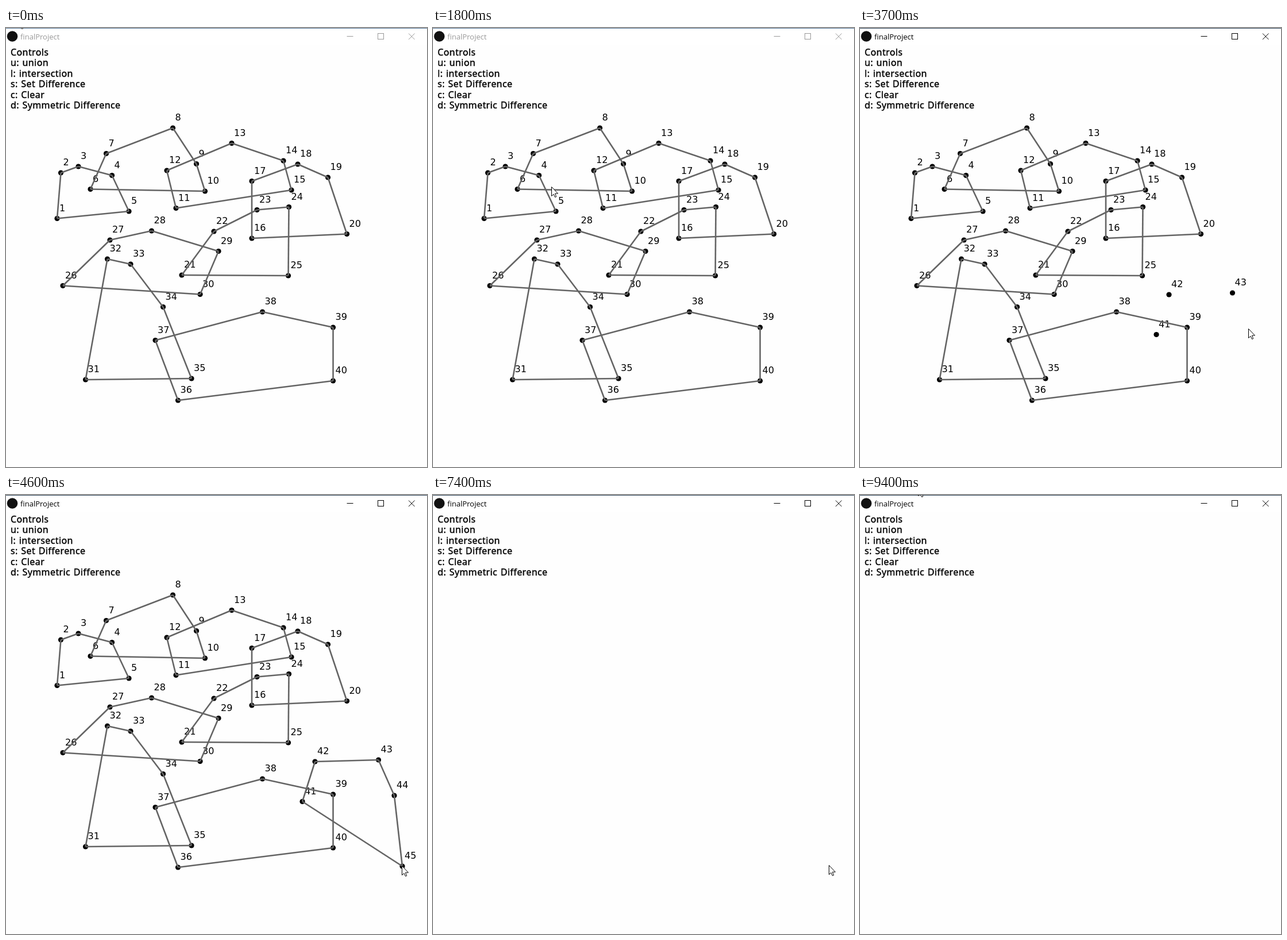
Animation, 733 px wide and 764 px high, one loop 9500 ms. Source, as an HTML page with a canvas:

```html
<!DOCTYPE html>
<html lang="en">
<head>
<meta charset="utf-8">
<title>Polygon union</title>
<style>
  html, body { margin: 0; width: 100%; height: 100%; overflow: hidden; background: #fff; }
  canvas { display: block; }
</style>
</head>
<body>
<canvas id="stage" width="733" height="764"></canvas>
<script>
const ctx = document.getElementById('stage').getContext('2d');
const LOOP = 9500, STEP = 100;
const FOCUS_AT = 2600, UNION_AT = 5100, CLEAR_AT = 7400;
const GRAY = '#646464', RED = '#ff0000';

// Corners in clicking order; the last polygon is clicked during the loop.
const polygons = [
  [[89, 331.5], [95.5, 252], [126, 241], [184.5, 256.5], [214, 319]],
  [[147, 280.5], [174.5, 218.5], [290.5, 174], [331.5, 236.5], [346.5, 284]],
  [[296, 313.5], [280, 248], [393, 200.5], [483, 231], [497, 282]],
  [[428, 366], [428, 266.5], [508, 237], [560.5, 260], [593.5, 358.5]],
  [[306, 430], [362, 354], [437, 316.5], [492.5, 311.5], [491.5, 431]],
  [[99, 448.5], [181, 369], [253.5, 353], [370, 388.5], [338, 463.5]],
  [[138.5, 612], [176.5, 402], [217, 411], [273.5, 485.5], [323, 610]],
  [[299.5, 648], [260, 543.5], [446.5, 494], [569.5, 521], [569.5, 614]],
  [[516, 533.5], [538, 464], [648.5, 461], [676, 523], [690, 646]]
];
const points = polygons.flat();
const clicked = polygons[polygons.length - 1];

// The cursor rests between moves and clicks one step after reaching a corner.
const entry = [21, -17];
const moves = [
  { from: 200, to: 600, goal: [181, 243] },
  { from: 1700, to: 1800, goal: [206, 276] },
  { from: 1800, to: 2200, goal: [541, 538] },
  { from: 2300, to: 2600, goal: clicked[0] },
  { from: 2700, to: 3000, goal: clicked[1] },
  { from: 3100, to: 3400, goal: clicked[2] },
  { from: 3500, to: 3700, goal: clicked[3] },
  { from: 3800, to: 4100, goal: clicked[4] },
  { from: 4400, to: 4800, goal: [689, 644] },
  { from: 7900, to: 8100, goal: [358, 14] },
  { from: 8100, to: 8200, goal: [495, 25] },
  { from: 8300, to: 8900, goal: [2, 6] },
  { from: 8900, to: 9300, goal: [101, -15] }
];
const clickTimes = moves.filter(m => clicked.includes(m.goal)).map(m => m.to + STEP);

const edgesOf = poly => poly.map((p, i) => [p, poly[(i + 1) % poly.length]]);
const mix = (a, b, k) => [a[0] + (b[0] - a[0]) * k, a[1] + (b[1] - a[1]) * k];
const easeOut = k => 1 - (1 - k) ** 2;

// Fraction along a-b at which it meets c-d, or null
function crossing([a, b], [c, d]) {
  const rx = b[0] - a[0], ry = b[1] - a[1], sx = d[0] - c[0], sy = d[1] - c[1];
  const qx = c[0] - a[0], qy = c[1] - a[1];
  const den = rx * sy - ry * sx;
  const k = (qx * sy - qy * sx) / den, m = (qx * ry - qy * rx) / den;
  return k > 0 && k < 1 && m > 0 && m < 1 ? k : null;
}

function inside([x, y], poly) {
  return edgesOf(poly).reduce((odd, [a, b]) =>
    (a[1] > y) !== (b[1] > y) && x < a[0] + (b[0] - a[0]) * (y - a[1]) / (b[1] - a[1]) ? !odd : odd, false);
}

// Pieces of the edges that lie outside all other polygons
function unionOutline() {
  const pieces = [];
  for (const poly of polygons) {
    const others = polygons.filter(p => p !== poly);
    const otherEdges = others.flatMap(edgesOf);
    for (const edge of edgesOf(poly)) {
      const cuts = otherEdges.map(e => crossing(edge, e)).filter(k => k !== null);
      const stops = [0, ...cuts, 1].sort((a, b) => a - b);
      for (let i = 1; i < stops.length; i++) {
        const middle = mix(...edge, (stops[i - 1] + stops[i]) / 2);
        if (!others.some(p => inside(middle, p)))
          pieces.push([mix(...edge, stops[i - 1]), mix(...edge, stops[i])]);
      }
    }
  }
  return pieces;
}
const outline = unionOutline();

function dot([x, y], r, color) {
  ctx.fillStyle = color;
  ctx.beginPath();
  ctx.arc(x, y, r, 0, 7);
  ctx.fill();
}

function strokeLine(a, b, color, width) {
  ctx.strokeStyle = color;
  ctx.lineWidth = width;
  ctx.beginPath();
  ctx.moveTo(...a);
  ctx.lineTo(...b);
  ctx.stroke();
}

function text(str, x, y, font, color = '#000') {
  ctx.font = font;
  ctx.fillStyle = color;
  ctx.fillText(str, x, y);
}

function drawControls() {
  ctx.save();
  ctx.letterSpacing = '0.4px';
  ctx.wordSpacing = '1px';
  ctx.strokeStyle = '#000';
  ctx.lineWidth = 0.4;
  ['Controls', 'u: union', 'l: intersection', 's: Set Difference', 'c: Clear', 'd: Symmetric Difference']
    .forEach((line, i) => {
      const y = Math.round(48 + 18.4 * i);
      text(line, 8, y, '16px "Noto Sans", sans-serif');
      ctx.strokeText(line, 8, y);
    });
  ctx.restore();
}

function drawWindow(active) {
  ctx.fillStyle = '#fff';
  ctx.fillRect(0, 0, 733, 764);
  ctx.fillStyle = '#fefefe';
  ctx.fillRect(0, 30, 733, 734);
  ctx.fillStyle = active ? '#34495e' : '#5b7c9c';
  ctx.fillRect(0, 0, 733, 1);
  dot([11, 14.5], 9.3, '#111');
  const ink = active ? '#000' : '#999';
  text('finalProject', 25, 20, '13px "Open Sans", sans-serif', ink);
  strokeLine([593.5, 14.5], [604.5, 14.5], ink, 1);
  ctx.strokeRect(647.5, 9.5, 10, 10);
  strokeLine([701, 9.5], [711.5, 20], ink, 1);
  strokeLine([711.5, 9.5], [701, 20], ink, 1);
  drawControls();
}

function drawPolygons(t) {
  const count = points.length - clickTimes.filter(c => c > t).length;
  points.slice(0, count).forEach(([x, y], i) => {
    dot([x, y], 4.6, '#000');
    text(i + 1, x + 4, y - 13, '16px "DejaVu Sans", sans-serif');
  });
  polygons.slice(0, Math.floor(count / 5)).flatMap(edgesOf)
    .forEach(([a, b]) => strokeLine(a, b, GRAY, 2.6));
  if (t < UNION_AT) return;
  const nodes = outline.flat();
  nodes.forEach(p => dot(p, 6, GRAY));
  nodes.forEach(p => dot(p, 4, RED));
  outline.forEach(([a, b]) => strokeLine(a, b, RED, 2.8));
}

function cursorAt(t) {
  return moves.filter(m => t > m.from).reduce((position, { from, to, goal }) =>
    mix(position, goal, easeOut(Math.min(1, (t - from) / (to - from)))), entry);
}

function drawCursor(t) {
  const [x, y] = cursorAt(t).map(Math.round);
  const arrow = new Path2D('M0 0V16L3.6 12.8L6 18L8.2 17.2L6 11.6H11Z');
  ctx.save();
  ctx.translate(x + 0.5, y + 0.5);
  ctx.lineJoin = 'round';
  ctx.lineWidth = 1;
  ctx.fillStyle = '#fff';
  ctx.strokeStyle = '#000';
  ctx.fill(arrow);
  ctx.stroke(arrow);
  ctx.restore();
}

const start = performance.now();
function frame() {
  const elapsed = (performance.now() - start) % LOOP;
  const t = Math.floor(elapsed / STEP) * STEP;
  drawWindow(t >= FOCUS_AT);
  if (t < CLEAR_AT) drawPolygons(t);
  drawCursor(t);
  requestAnimationFrame(frame);
}
frame();
</script>
</body>
</html>
```
